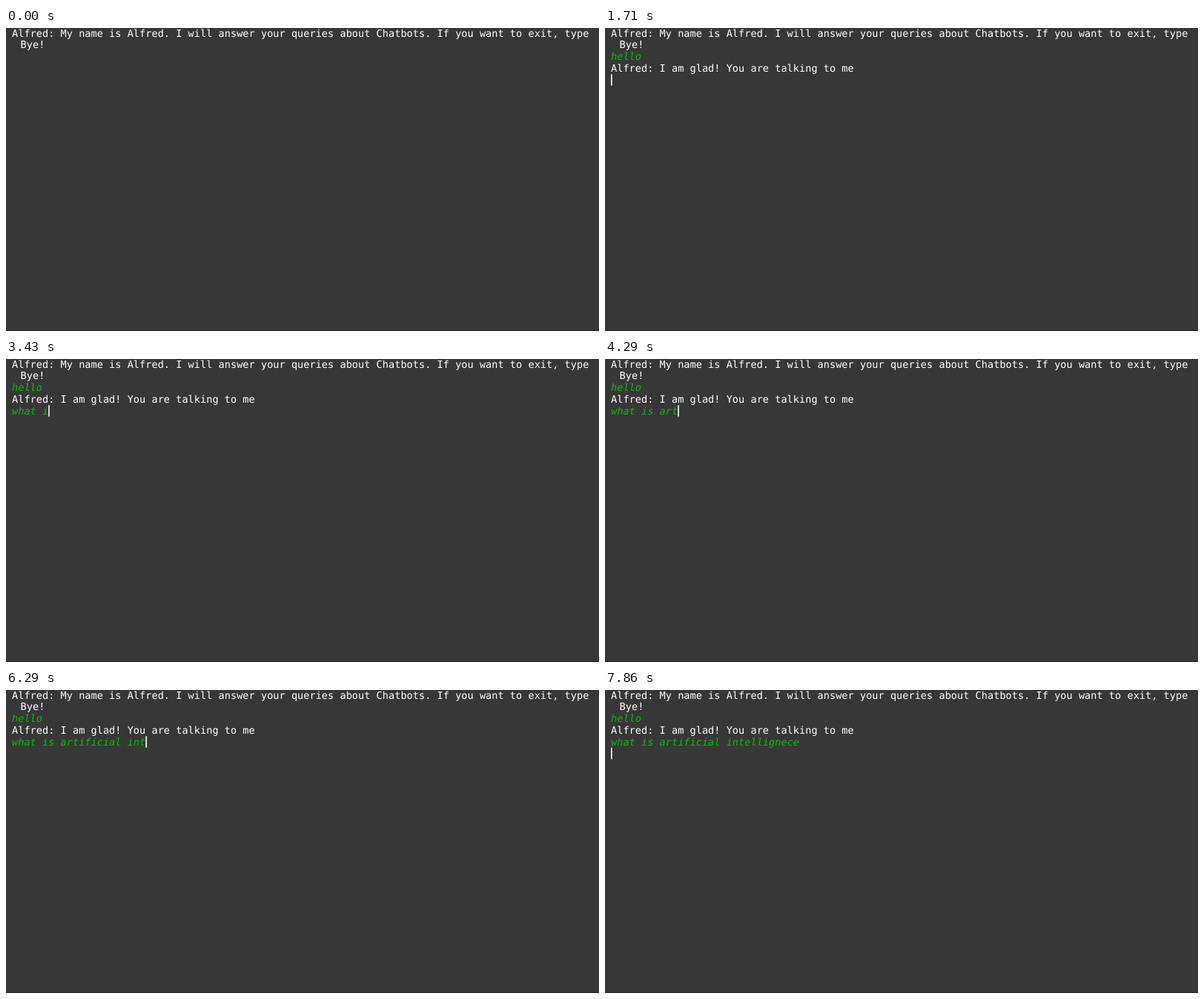
An HTML page that plays this animation: 800 px wide and 409 px high, repeating every 8000 ms.

```html
<!DOCTYPE html>
<html lang="en">
<head>
<meta charset="utf-8">
<title>Chatbot console</title>
<style>
  html, body { margin: 0; width: 100%; height: 100%; overflow: hidden; background: #383738; }
  svg { display: block; width: 800px; height: 409px; }
  text {
    font: 13.62px "DejaVu Sans Mono", monospace;
    fill: #fff;
    white-space: pre;
    text-rendering: geometricPrecision;
  }
  .input { font-style: italic; fill: #06c006; }
</style>
</head>
<body>
<svg viewBox="0 0 800 409">
  <rect width="800" height="409" fill="#383738"/>
  <rect y="408" width="800" height="1" fill="#272326"/>
  <text x="8" y="11.6">Alfred: My name is Alfred. I will answer your queries about Chatbots. If you want to exit, type</text>
  <text x="19.6" y="27.4">Bye!</text>
  <text id="hello" class="input" x="8" y="43.1"></text>
  <text id="reply" x="8" y="58.9">Alfred: I am glad! You are talking to me</text>
  <text id="question" class="input" x="8" y="74.6"></text>
  <rect id="caret" width="1.6" height="15.4" fill="#fff"/>
</svg>
<script>
const LOOP = 8000, LEFT = 8, CHAR = 8.2, LINE = 15.75;
const $ = id => document.getElementById(id);
const hello = $("hello"), reply = $("reply"), question = $("question"), caret = $("caret");

const CARET_ON = 430, ENTER_1 = 1430, REPLY = 1710, ENTER_2 = 7860;

// Each burst: [start time, keys], one key per tick within the burst
const TICK = 1000 / 7;
const keyTimes = bursts => bursts.flatMap(([start, keys]) =>
  Array.from({ length: keys }, (_, i) => start + i * TICK));

const greeting = { text: "hello", times: keyTimes([[570, 5]]) };
const query = {
  text: "what is artificial intellignece",
  times: keyTimes([[2290, 1], [2570, 1], [2860, 3], [3430, 4], [4140, 2],
                   [4570, 3], [5285, 8], [6428, 8], [7570, 1]])
};

const typed = (line, t) => line.text.slice(0, line.times.filter(k => k <= t).length);

function render(t) {
  const a = typed(greeting, t), b = typed(query, t);
  hello.textContent = a;
  question.textContent = b;
  reply.style.visibility = t >= REPLY ? "visible" : "hidden";
  caret.style.visibility = t >= CARET_ON ? "visible" : "hidden";

  const [row, col] =
    t < ENTER_1 ? [2, a.length] :
    t < REPLY ? [3, 0] :
    t < ENTER_2 ? [4, b.length] : [5, 0];
  caret.setAttribute("x", LEFT + col * CHAR);
  caret.setAttribute("y", -0.7 + row * LINE);
}

const origin = performance.now();
function loop() {
  render((performance.now() - origin) % LOOP);
  requestAnimationFrame(loop);
}
loop();
</script>
</body>
</html>
```
